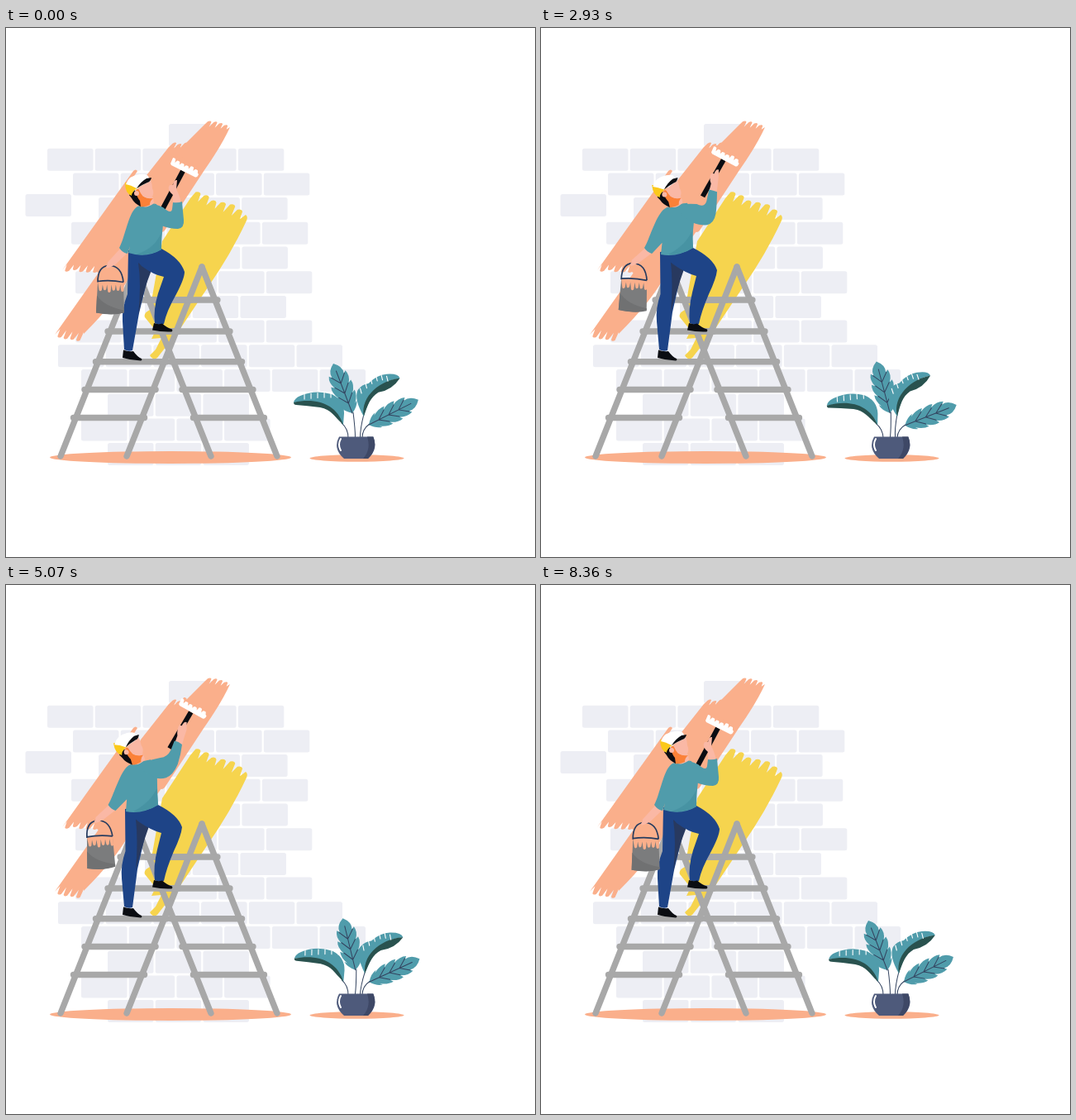
An HTML page that plays this animation: 640x640 px, repeating every 8430 ms.

```html
<!DOCTYPE html>
<html lang="en">
<head>
<meta charset="utf-8">
<title>Painter on a ladder</title>
<style>
html, body { margin: 0; width: 100%; height: 100%; overflow: hidden; background: #fff; }
svg { display: block; width: 100%; height: 100%; }
.paint { fill: #faaf8b; }
.teal { fill: #509cab; }
.leafDark { fill: #29524f; }
.skin { fill: #fab8a5; }
.navy { fill: #1e4487; }
.black { fill: #0b0d12; }
.white { fill: #fff; }
.line { fill: none; stroke: #33435f; stroke-linecap: round; }
.cut { fill: none; stroke: #fff; stroke-width: 1.1; stroke-linecap: round; }
</style>
</head>
<body>
<svg viewBox="0 0 640 640">
  <g id="bricks" fill="#edeef4"></g>
  <path id="wallPaint" class="paint"/>
  <path id="yellowPaint" fill="#f6d44e"/>
  <ellipse class="paint" cx="199" cy="519.5" rx="146" ry="7.5"/>
  <ellipse class="paint" cx="424.5" cy="520.5" rx="57" ry="4.2"/>
  <g id="ladder" stroke="#a8a8a8" stroke-width="7.4" stroke-linecap="round"></g>

  <g id="leafLeft"></g>
  <g id="leafMid"></g>
  <g id="leafFold"></g>
  <g id="leafRight"></g>
  <path fill="#4e5a7b" d="M403 494.500 H444 Q451 509 438 521 H409 Q395 509 403 494.500Z"/>
  <path fill="#3e4866" d="M437 494.500 H444.500 Q450 509 438 521 H432 Q442 510 437 494.500Z"/>
  <path fill="none" stroke="#fff" stroke-width="2" stroke-linecap="round" d="M405 497 Q401 504 405 511"/>

  <path id="backLeg" class="navy"/>
  <path id="legShade" fill="#28395f"/>
  <path id="frontLeg" class="navy"/>
  <path class="black" d="M142 389.500 Q148 392 154 391 Q159 398 164 400 Q165 402 163 402.500 Q151 402 141 399Z"/>
  <path class="black" d="M179 357 Q184 359 189 357.500 Q195 363 201 364.500 Q202 367 200 367.500 Q188 368 177 365.500Z"/>
  <path id="leftHand" class="skin"/>
  <path id="torso" class="teal"/>
  <path id="torsoShade" fill="#4793a3"/>
  <g id="tool">
    <path d="M-2 3 L-26 48" stroke="#0b0d12" stroke-width="6"/>
    <path id="rollerPaint" class="paint"/>
    <path id="roller" class="white"/>
  </g>
  <path id="rightHand" class="skin"/>
  <path id="rightArm" class="teal"/>
  <g id="head">
    <path class="skin" d="M164 201 L178 205 L179 212 Q170 219 163 215Z"/>
    <path fill="#fb8138" d="M158 195 Q165 194 165 203 Q171 207 178 206 Q174 209 174 214 Q168 217 162 216 Q160 207 154 202Z"/>
    <path class="skin" d="M160 194 L175 184 Q177 189 177 194 Q180 200 176 206 Q167 207 163 200Z"/>
    <path class="black" d="M149 202 L156 196 Q159 206 162 209 L163 216 Q155 212 152 206Z"/>
    <circle class="skin" cx="158" cy="200" r="3"/>
    <path fill="#fbc91b" d="M144 187 Q152 187 160 193 Q152 198 152 203 Q144 200 144 187Z"/>
    <path class="white" d="M145 189 Q149 178 162 177 Q171 176 173 181 L175 185 L158 194 Q151 190 145 189Z"/>
    <path class="black" d="M158 194 Q163 186 170 182 L176 181 Q175 186 171 187 Q164 190 158 194Z"/>
  </g>

  <g id="bucket">
    <path fill="#7b7c7d" d="M-15 20 H16 L17 56 Q4 61 -17 57Z"/>
    <path fill="#707172" d="M-16 36 Q-8 49 17 54 L17 57 Q4 61 -17 57Z"/>
    <path id="drips" class="paint"/>
    <path d="M-15 20 Q-15 0 -1 0 Q14 0 16 20 M-15 19 Q0 17 16 20" fill="none" stroke="#263c5f" stroke-width="1.700"/>
  </g>
  <path id="fingers" class="skin"/>
</svg>
<script>
const LOOP = 8430, STROKE = LOOP / 2;
const el = id => document.getElementById(id);
const draw = (id, d) => el(id).setAttribute('d', d);
const move = (id, transform) => el(id).setAttribute('transform', transform);
const spin = (id, angle, x) => move(id, `rotate(${angle} ${x} 495)`);
const mix = (a, b, k) => a + (b - a) * k;
const random = seed => Math.abs(Math.sin(seed * 12.9898) * 43758.5453) % 1;

// Ragged edge from one point to another, with teeth along (dx, dy)
function teeth(x1, y1, x2, y2, count, dx, dy) {
  const at = (k, e) => `${mix(x1, x2, k) + dx * e} ${mix(y1, y2, k) + dy * e} `;
  let d = '';
  for (let i = 0; i < count; i++) {
    const e = 0.55 + 0.45 * random(i + x1);
    d += `L${at(i / count, e)}Q${at((i + .35) / count, e + .25)}${at((i + .6) / count, e)}L${at((i + .8) / count, 0)}`;
  }
  return d;
}

// First brick and brick count of each course
const courses = [[197, 1], [50, 5], [81, 5], [112, 4], [79, 5], [170, 3], [84, 5],
  [168, 3], [84, 5], [63, 6], [91, 6], [123, 3], [91, 4], [123, 3]];
const brick = (x, y) => `<rect x="${x}" y="${y}" width="55.5" height="27" rx="2.5"/>`;
el('bricks').innerHTML = brick(23.5, 201) + courses.map(([x, n], row) =>
  Array.from({ length: n }, (_, i) => brick(x + i * 57.7, 116 + row * 29.7)).join('')).join('');

draw('wallPaint',
  `M160 240 L112 297 ${teeth(114, 288, 72, 286, 5, -5, 9)}L68 293 L154 173 Q157 170 159 173 L152 184Z` +
  `M94 368 ${teeth(94, 370, 64, 364, 4, -5, 9)}L59 371 L112 296 L163 187 L197 144 ${teeth(197, 146, 220, 144, 3, 5, -7)}L236 140 L188 246 L150 300 Q134 330 94 370Z` +
  `M170 240 L215 142 L240 117 ${teeth(240, 119, 268, 123, 4, 5, -7)}L271 120 Q261 142 240 172 L192 245 Q188 249 186 245Z`);
draw('yellowPaint',
  `M189 258 L223 206 ${teeth(224, 207, 285, 232, 6, 7, -11)}L290 226 Q293 228 291 233 Q276 265 258 293 L212 362 L183 399 Q178 403 174 396 L181 389 L188 375 L176 376 L181 366 L168 350 Q166 345 174 341Z`);
draw('rollerPaint', `M-14 -9 ${teeth(-13, -11, 17, 3, 5, 3, -6)}L17 7Z`);
draw('roller', `M-17 -6 ${teeth(-16, -9, 17, 6, 6, 2, -4)}L17 7 Q15 12 12 10 L-16 -4Z`);
draw('drips', `M-15 19 H16 L16.5 23 ${teeth(16.5, 23, -15.5, 23, 6, 0, 9)}Z`);

const bar = (x1, y1, x2, y2) => `<line x1="${x1}" y1="${y1}" x2="${x2}" y2="${y2}"/>`;
const LEAN = 0.397, APEX = 289;
const rails = [157, 237].map(x =>
  bar(x, APEX, x - LEAN * 229, 518) + bar(x, APEX, x + LEAN * 229, 518));
const rungs = [329, 367, 403.7, 437.5, 471.5].map(y => {
  const spread = (y - APEX) * LEAN;
  return [-spread, spread].map(dx => bar(154 + dx, y, 240 + dx, y)).join('');
});
el('ladder').innerHTML = rails.concat(rungs).flat().join('');

const stem = (x, bx, by) => `<path class="line" d="M${x} 496 Q${x} 485 ${bx} ${by}"/>`;

// Flat leaf: two lobed halves along an axis, with veins
function openLeaf(x1, y1, x2, y2, width, lobes = 5) {
  const length = Math.hypot(x2 - x1, y2 - y1), nx = (y1 - y2) / length, ny = (x2 - x1) / length;
  const half = s => width * Math.pow(Math.max(0, 4 * s * (1 - s)), .45);
  const at = (s, w) => `${mix(x1, x2, s) + nx * w} ${mix(y1, y2, s) + ny * w} `;
  let outline = '', veins = `M${at(0, 0)}L${at(.85, 0)}`;
  for (const side of [-1, 1]) {
    outline += `M${at(0, 0)}`;
    for (let i = 0; i < lobes; i++) {
      const a = i / lobes, b = (i + 1) / lobes, mid = mix(a, b, .45);
      outline += `Q${at(mid, side * half(mid) * 1.15)}${at(b, side * half(b))}`;
      if (i < lobes - 1) outline += `L${at(b - .04, side * half(b) * .72)}`;
      if (i > 0 && i < lobes - 1) veins += `M${at(a, 0)}L${at(a + .16, side * width * .65)}`;
    }
    outline += 'Z';
  }
  return `<path class="teal" d="${outline}"/><path class="line" d="${veins}"/>`;
}

// Folded leaf: light upper side with short cuts along its back, dark underside
function foldedLeaf(light, dark, cuts) {
  return `<path class="teal" d="${light}"/><path class="leafDark" d="${dark}"/><path class="cut" d="${cuts}"/>`;
}
const cutsAlong = (count, x, y, stepX, rise, lean) => Array.from({ length: count }, (_, i) =>
  `M${x + i * stepX} ${y - rise * Math.sin(i / (count - 1) * 2)}l${lean} 6`).join('');

el('leafLeft').innerHTML = stem(414, 406, 478) + foldedLeaf(
  'M348 453 Q349 448 356 445 Q374 437 394 443 Q409 450 409 466 L408 480 C397 459 375 450 348 453Z',
  'M348 453 C376 447 400 455 408 480 C396 469 394 462 380 459 Q364 457 351 456 Q348 456 348 453Z',
  cutsAlong(6, 361, 443, 8, 2, 0));
el('leafMid').innerHTML = stem(422.5, 420, 465) + openLeaf(419, 466, 396, 406, 13);
el('leafFold').innerHTML = stem(428.5, 433, 468) + foldedLeaf(
  'M433 470 Q421 449 426 438 Q431 431 439 430 Q449 420 461 419 Q475 418 477 424 Q445 427 433 470Z',
  'M477 424 C455 426 429 444 433 470 C438 456 441 447 451 441 Q468 438 477 424Z',
  cutsAlong(6, 429, 436, 6.4, 16, 1.5));
el('leafRight').innerHTML = stem(431, 440, 479) + openLeaf(439, 480, 499, 450, 12);

function ease(t, from, to) {
  const x = Math.min(1, Math.max(0, (t - from) / (to - from)));
  return x * x * (3 - 2 * x);
}
const wave = (t, peak, period = LOOP) => Math.cos((t - peak) / period * 2 * Math.PI);

// Builds a point maker for a shape that blends between two poses
const blend = k => (x1, y1, x2, y2) => `${mix(x1, x2, k).toFixed(2)} ${mix(y1, y2, k).toFixed(2)} `;

function render(t) {
  const s = t % STROKE;
  const reach = ease(s, 0, 1070) - ease(s, 2080, 4120);
  const hips = ease(t, 0, 900) - ease(t, 5850, 8200);
  const swing = hips * mix(.62, 1, reach);
  const kick = Math.pow(t / 860 * Math.exp(1 - t / 860), 2);
  const bx = mix(126, 111, swing) - 3.5 * kick, by = mix(287.5, 285, hips) - 2.5 * kick;
  const tilt = 11 * kick + 4 * Math.sin(t / LOOP * 6 * Math.PI);

  spin('leafLeft', -.4 - 3.1 * wave(t, 2300), 414);
  spin('leafMid', 4 + 4 * wave(t, 4250), 423);
  spin('leafFold', -.4 - 5.2 * wave(t, 2100), 431);
  spin('leafRight', 3.4 + 3.6 * wave(t, 2200, STROKE), 432);

  const r = blend(reach), elbow = blend(reach * reach), h = blend(hips), a = blend(swing);
  draw('backLeg', `M${h(148, 269, 144, 271)}L${h(147, 322, 144.5, 322)}Q${h(140, 339, 138.5, 339)}${h(141, 355, 140, 355)}L143 389 Q148 392 153 390 L${h(161, 345, 159, 344)}L${h(174, 292, 171, 291)}L${h(188, 268, 184, 266)}Z`);
  draw('legShade', `M${h(160, 284, 157, 283)}L${h(176, 293, 173, 292)}Q${h(166, 318, 164, 317)}${h(160, 347, 157, 345)}Q${h(164, 310, 160, 310)}${h(160, 284, 157, 283)}Z`);
  draw('frontLeg', `M${h(150, 272, 146, 274)}L${h(188, 267, 184, 266)}Q${h(211, 279, 208, 278)}${h(216, 295, 213, 293)}Q${h(216, 303, 212, 303)}${h(206, 322, 203, 322)}Q194 343 191 358 Q186 360 180 357 Q178 341 ${h(184, 321, 183, 320)}L${h(191, 301, 188, 300)}Q${h(179, 299, 176, 297)}${h(164, 288, 160, 286)}Z`);

  draw('torso', `M${r(162, 215, 152, 217)}Q${r(172, 211, 165, 213)}${r(182, 213, 174, 211)}L${r(190, 238, 182, 232)}Q${h(188, 255, 183, 250)}${h(188, 268, 184, 266)}Q${h(170, 279, 164, 278)}${h(148, 272, 145, 274)}L${a(150, 264, 146, 259)}L${a(147, 273, 132, 273)}Q${a(141, 272, 126, 271)}${a(137, 266, 123, 266)}C${a(146, 248, 132, 250)}${a(149, 217, 140, 217)}${r(162, 215, 152, 217)}Z`);
  draw('torsoShade', `M${h(187.5, 248, 182.5, 246)}L${h(188, 268, 184, 266)}Q${h(176, 275, 172, 274)}${h(158, 274, 154, 274)}Q${h(181, 266, 175, 263)}${h(187.5, 248, 182.5, 246)}Z`);

  move('tool', `translate(${r(216, 170, 227, 148.5)}) rotate(${2.5 * reach})`);
  draw('rightHand', `M${r(202, 212, 204, 190)}L${r(202, 202, 208, 180)}Q${r(194, 195, 208, 172)}${r(198, 190, 211, 167)}L${r(202, 190, 214, 168)}Q${r(203, 183, 217, 162)}${r(207, 184, 220, 164)}L${r(206, 195, 220, 173)}Q${r(210, 202, 216, 182)}${r(212, 212, 213, 192)}Z`);
  draw('rightArm', `M${r(178, 213, 164, 214)}Q${r(184, 214, 176, 211)}${elbow(190, 217, 186, 207)}Q${elbow(200, 226, 194, 204)}${elbow(201, 219, 199, 195)}L${r(202, 211, 204, 186)}Q${r(208, 212, 209, 187)}${r(213, 210, 213, 191)}Q${elbow(214, 222, 211, 201)}${elbow(215, 232, 206, 213)}Q${elbow(216, 242, 199, 227)}${elbow(208, 243, 190, 231)}Q${elbow(198, 243, 185, 233)}${r(188, 239, 180, 233)}L${r(178, 230, 164, 224)}Z`);
  move('head', `translate(${-12 * reach} ${reach}) rotate(${-9 * reach} 167 212)`);

  draw('leftHand', `M${a(138, 267, 124, 266)}L${a(146, 273, 131, 273)}L${bx + 6} ${by - 1} L${bx - 4} ${by + 3} L${bx - 3} ${by - 4}Z`);
  draw('fingers', `M${bx + 5} ${by - 4} Q${bx - 2} ${by - 4} ${bx - 5} ${by + 1} L${bx - 4} ${by + 3} Q${bx + 2} ${by + 2} ${bx + 6} ${by - 2}Z`);
  move('bucket', `translate(${bx} ${by}) rotate(${tilt})`);
}

const start = performance.now();
function tick() {
  render((performance.now() - start) % LOOP);
  requestAnimationFrame(tick);
}
tick();
</script>
</body>
</html>
```
